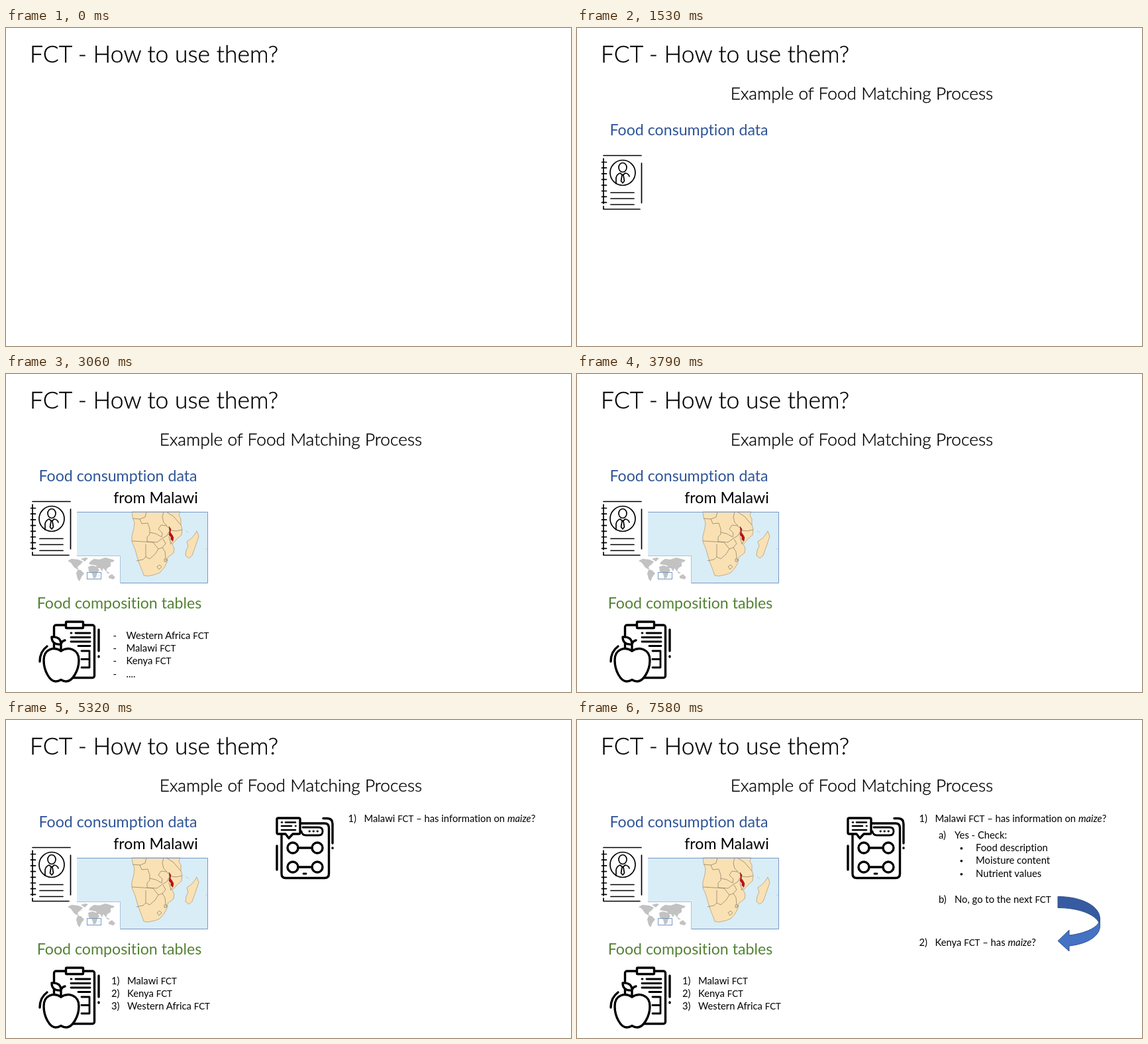
Animation of 853 by 480 pixels, one loop 8 s. Source, as an HTML page:

```html
<!DOCTYPE html>
<html lang="en">
<head>
<meta charset="utf-8">
<title>FCT - How to use them?</title>
<style>
  html, body { margin: 0; width: 100%; height: 100%; overflow: hidden; background: #fff; }
  svg { display: block; width: 100vw; height: 100vh; }
  text { font-family: Lato, sans-serif; font-variant-ligatures: none; }
  .title, .sub { font-weight: 300; text-anchor: middle; stroke: #000; stroke-width: .35px; }
  .title { font-size: 35.5px; }
  .sub { font-size: 26.3px; }
  .label { font-size: 23.2px; text-anchor: middle; }
  .item { font-size: 14.8px; }
  .caps { font-size: .9em; }
  .dot { font-size: 10px; }
  .ink { fill: none; stroke: #000; stroke-linecap: round; stroke-linejoin: round; }
  .paper { fill: #fff; }
</style>
</head>
<body>
<svg viewBox="0 0 853 480" id="stage">
  <rect width="853" height="480" fill="#fff"/>
  <g data-from="0"><text class="title" x="223.5" y="52">FCT - How to use them?</text></g>
  <g data-from="800"><text class="sub" x="430" y="108">Example of Food Matching Process</text></g>

  <g data-from="1530">
    <text class="label" x="169" y="162" fill="#2f5597">Food consumption data</text>
  </g>

  <g data-from="2330">
    <text class="label" x="226" y="195">from Malawi</text>
    <rect x="107" y="208" width="198" height="108" fill="#d9edf7"/>
    <g fill="#fae1b4" stroke="#b5a078" stroke-width=".8" stroke-linejoin="round">
      <path d="M190 208 191 216 194 224 193 233 190 245 190 253 195 265 198 276 202 288 206 298 208 304 214 305 224 303 232 300 239 292 243 284 244 277 253 270 254 263 251 257 258 249 265 243 266 235 264 227 264 219 261 213 263 208Z"/>
      <path d="M288 237 291 245 287 257 281 274 276 278 271 274 272 266 275 260 273 253 280 248 285 242Z"/>
      <path fill="none" stroke="#8f8468" d="M191 218 202 219 205 226 214 225 217 234 217 242 213 246 213 253M190 252 206 253 222 254M197 282 207 280 211 276 211 257M213 253 228 254 236 248 243 244 246 238M217 239 226 241 235 246 236 240 230 234 234 228 242 229 245 232M222 254 230 264 225 272 217 279 211 276M230 264 236 262 241 256 237 249M236 262 240 268 241 278 244 282M212 208 210 216 202 219M238 208 236 216 238 224 243 229M242 208 253 215 264 228M249 236 257 237 266 235M252 251 249 257 246 245"/>
      <path stroke="#8f8468" d="M228 291 232 288 235 291 231 295ZM239 279 242 279 242 283 239 283Z"/>
    </g>
    <path fill="#c60c12" stroke="#7c2020" stroke-width=".6" d="M246 230 249 234 248 239 251 243 253 247 252 252 249 250 249 246 246 243 247 237Z"/>
    <path fill="none" stroke="#8099b0" stroke-dasharray="1 2" d="M272 237 277 240M302 264h2"/>
    <path fill="none" stroke="#7697c0" d="M107 208.5H304.5V315.5H173"/>
    <rect x="89" y="274" width="84" height="42" fill="#fff"/>
    <path fill="none" stroke="#a9c3de" d="M107 274.5H172.5V316"/>
    <path fill="#c2c2c2" d="M93 282 99 279 109 280 116 283 113 287 109 290 108 293 112 297 108 295 103 292 98 285ZM113 279 120 277 124 278 119 283ZM108 296 113 296 118 301 114 306 111 313 108 309 106 301ZM124 291 130 289 137 291 141 296 138 300 136 307 132 309 130 301 125 298ZM125 287 127 283 133 279 141 280 150 277 164 281 161 284 158 284 158 290 153 293 151 298 147 293 145 298 142 293 138 293 136 289 131 288ZM155 305 160 302 165 307 162 310 155 308ZM151 297 157 301 153 301ZM140 303 141 303 140 307Z"/>
    <rect x="122.500" y="299.500" width="21" height="10" fill="none" stroke="#7697c0"/>
  </g>

  <g data-from="1530" class="ink" stroke-width="1.7">
    <path d="M40 192.500H97M97.500 204V264M40 269V273.500H95M40 197V265"/>
    <path id="rings"/>
    <circle cx="69" cy="218.500" r="19"/>
    <ellipse cx="69" cy="210.500" rx="6" ry="7"/>
    <path d="M59 235V226Q60 221 65 219L69 222 73 219Q78 220 79 224M68 222 66.500 231 69 234 71.500 231 70 222M51 248.500H86M51 257.500H86M51 266.500H86"/>
  </g>

  <g data-from="3060">
    <text class="label" x="171" y="354" fill="#548235">Food composition tables</text>
    <g class="ink" stroke-width="3.4">
      <rect x="72.500" y="379" width="61" height="79.500" rx="3"/>
      <rect class="paper" x="90.500" y="374" width="26" height="9.500" rx="1"/>
      <path d="M140 386V418M140 426v1"/>
      <path stroke-width="2.8" d="M105 391H127M98 391h1M98 397.500H127M98 404H127M109 410.500H127M114 418H126V443H114M114 430.500H126"/>
      <path d="M51 434Q51 419 62 411"/>
      <path class="paper" d="M83 418C72 411 57 415 57 432C57 448 66 464 75 464Q79 464 83 461.500Q87 464 91 464C100 464 110 448 110 432C110 415 94 411 83 418Z"/>
      <path class="paper" d="M83 408C73 409 69 404 69 397C78 396 83 400 83 408ZM83 418V408Q84 403 89 402"/>
    </g>
  </g>
  <g data-from="3060" data-to="3790" id="loose"></g>
  <g data-from="4590" id="ranked"></g>

  <g data-from="5320">
    <g class="ink" stroke-width="3.4">
      <path d="M416 172V232Q416 238.500 422 238.500H481Q487.500 238.500 487.500 232V163Q487.500 156 481 156H444"/>
      <path d="M479 148.500H485Q493 148.500 493 157V186M493 193v.5M409 190V226"/>
      <path class="paper" d="M411 148H442Q444 148 444 150V170Q444 172 442 172H433L427 178.500 422 172H411Q409 172 409 170V150Q409 148 411 148Z"/>
      <path stroke-width="2.6" d="M416 154.500h1M422 154.500H437M416 160H431M437 160h.5M416 166H437"/>
      <path stroke-width="2.8" d="M448 162H472Q478 162 478 168T472 174H453Q447 174 446 168M458 168h.5M464 168h.5M470 168h.5M449 232H453"/>
      <g id="links"></g>
    </g>
    <g id="first"></g>
  </g>
  <g data-from="6120" id="yes"></g>
  <g data-from="6850" id="no"></g>

  <g data-from="7580">
    <g id="second"></g>
    <g stroke="#2f528f" stroke-linejoin="round">
      <path fill="#4472c4" d="M789.500 303C785 314 767 322 743 325V317L726 333.500 743 349V341C771 338 789.500 326 789.500 311Z"/>
      <path fill="#365ba0" d="M726 266.500C762 266.500 789.500 281 789.500 300V304L788 306C782 293 757 283.500 726 283.500Z"/>
    </g>
  </g>
</svg>
<script>
const LOOP = 8000;
const $ = id => document.getElementById(id);

// Rows are [marker, text, baseline]
function list(id, markX, textX, rows) {
  $(id).innerHTML += rows.map(([mark, text, y]) =>
    `<text class="item" x="${markX}" y="${y}">${mark}</text>` +
    `<text class="item" x="${textX}" y="${y}">${text}</text>`).join("");
}

const fct = '<tspan class="caps">FCT</tspan>';
const maize = '<tspan font-style="italic">maize</tspan>?';
const dot = '<tspan class="dot" dy="-1.5">•</tspan>';

list("loose", 161.5, 181.5, [
  ["-", `Western Africa ${fct}`, 400], ["-", `Malawi ${fct}`, 419],
  ["-", `Kenya ${fct}`, 438], ["-", "....", 458]
]);
list("ranked", 159, 183, [
  ["1)", `Malawi ${fct}`, 399], ["2)", `Kenya ${fct}`, 418], ["3)", `Western Africa ${fct}`, 437]
]);
list("first", 516.5, 540.5, [["1)", `Malawi ${fct} – has information on ${maize}`, 154]]);
list("yes", 546, 570, [["a)", "Yes - Check:", 179]]);
list("yes", 577.5, 602, [
  [dot, "Food description", 198], [dot, "Moisture content", 217], [dot, "Nutrient values", 237]
]);
list("no", 546, 570, [["b)", `No, go to the next ${fct}`, 276]]);
list("second", 516.5, 540.5, [["2)", `Kenya ${fct} – has ${maize}`, 341]]);

$("rings").setAttribute("d",
  Array.from({ length: 8 }, (_, i) => `M37.5 ${202.5 + i * 8.7}H44.5`).join(""));
$("links").innerHTML = [193, 222].map(y =>
  `<circle cx="433" cy="${y}" r="8"/><circle cx="470" cy="${y}" r="8"/><path d="M441 ${y}H462"/>`).join("");

const parts = [...document.querySelectorAll("[data-from]")].map(el => ({
  el, from: +el.dataset.from, to: +(el.dataset.to || LOOP)
}));

function draw(t) {
  for (const { el, from, to } of parts) {
    el.style.display = t >= from && t < to ? "" : "none";
  }
}

const start = performance.now();
function tick() {
  draw((performance.now() - start) % LOOP);
  requestAnimationFrame(tick);
}
tick();
</script>
</body>
</html>
```
